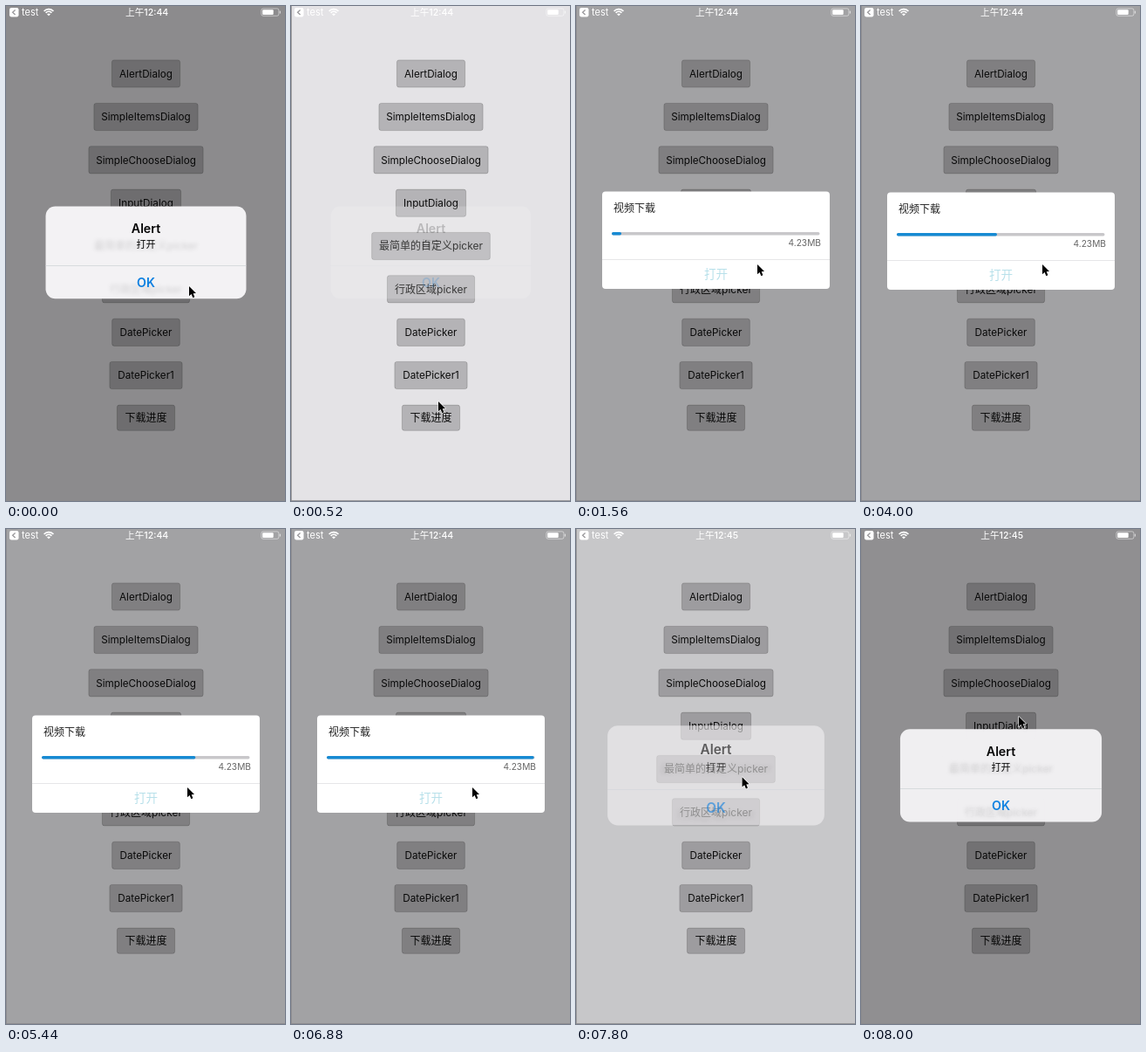
Recreate the animation shown at these times as an HTML page with a canvas. Size 320 by 567 pixels, loop 8.04 s.

```html
<!DOCTYPE html>
<html lang="zh">
<head>
<meta charset="utf-8">
<title>Dialogs</title>
<style>
  html, body { margin: 0; width: 100%; height: 100%; overflow: hidden; background: #e8e7ea; }
  canvas { display: block; width: 100vw; height: 100vh; }
</style>
</head>
<body>
<canvas id="stage"></canvas>
<script>
const W = 320, H = 567, LOOP = 8040, CX = 160.5;
const FONT = 'Inter, "Noto Sans CJK SC", "Noto Sans CJK", sans-serif';
const canvas = document.getElementById('stage');
const ctx = canvas.getContext('2d');
const ratio = window.devicePixelRatio || 1;
canvas.width = W * ratio;
canvas.height = H * ratio;

// label, centre y, width, height, font size
const buttons = [
  ['AlertDialog', 77.5, 79, 32, 11.7],
  ['SimpleItemsDialog', 127, 120, 32, 11.7],
  ['SimpleChooseDialog', 176.3, 132, 32, 11.7],
  ['InputDialog', 225.7, 81, 32, 11.7],
  ['最简单的自定义picker', 275, 136.5, 32, 12],
  ['行政区域picker', 324.3, 101, 32, 12],
  ['DatePicker', 373.8, 78.5, 32, 11.7],
  ['DatePicker1', 423, 84, 32, 11.7],
  ['下载进度', 471.7, 67, 30, 12]
];

// time, x, y of the pointer tip
const pointerPath = [
  [0, 210, 321], [80, 165, 313], [280, 165, 313], [520, 169, 453],
  [680, 165, 468], [1120, 165, 468], [1500, 208, 296], [7040, 208, 296],
  [7280, 194, 309], [7700, 194, 309], [8000, 181, 215], [LOOP, 181, 215]
];

const clamp = (v, lo = 0, hi = 1) => Math.min(hi, Math.max(lo, v));
const progress = (t, from, to) => clamp((t - from) / (to - from));
const smooth = p => p * p * (3 - 2 * p);
// Remaining distance of a critically damped spring
const settle = x => x < 0 ? 1 : (1 + x) * Math.exp(-x);
// Remaining distance of a slightly bouncy spring, s in seconds
const bounce = s => s < 0 ? 1 : Math.exp(-11 * s) * (Math.cos(10.45 * s) + 1.05 * Math.sin(10.45 * s));

function text(str, x, baseline, size, color, align = 'center', weight = 400) {
  ctx.font = `${weight} ${size}px ${FONT}`;
  ctx.textAlign = align;
  ctx.fillStyle = color;
  ctx.fillText(str, x, baseline);
}

function box(x, y, w, h, r, fill, stroke) {
  ctx.beginPath();
  ctx.roundRect(x, y, w, h, r);
  if (fill) { ctx.fillStyle = fill; ctx.fill(); }
  if (stroke) { ctx.strokeStyle = stroke; ctx.lineWidth = 0.8; ctx.stroke(); }
}

function rect(x, y, w, h, color) {
  ctx.fillStyle = color;
  ctx.fillRect(x, y, w, h);
}

function drawPage() {
  rect(0, 0, W, H, '#e8e7ea');
  for (const [label, y, w, h, size] of buttons) {
    box(CX - w / 2 + 0.4, y - h / 2 + 0.4, w - 0.8, h - 0.8, 2.5, 'rgba(0,0,0,.21)', 'rgba(0,0,0,.22)');
    text(label, CX, y + 4.3, size, '#0b0b0b');
  }
}

function drawDownload(t, shift) {
  const done = t > 6940;
  const end = clamp(52 + 0.0426 * (t - 1560), 41, 279.5);
  ctx.save();
  ctx.translate(0, shift);
  box(30, 213.5, 261, 111.5, 4, '#fff');
  text('视频下载', 43, 237.3, 12, '#222', 'left');
  box(41, 260, 238.5, 3.5, 1.7, '#c8c7ca');
  if (end > 41) box(41, 260, end - 41, 3.5, 1.7, '#168ad3');
  text('4.23MB', 281, 275.8, 10.2, '#666', 'right');
  rect(30, 291, 261, 0.7, '#dcdcde');
  text('打开', CX, 313, 13.6, done ? '#1097d5' : '#b7e0ea');
  ctx.restore();
}

function drawAlert(alpha, scale) {
  ctx.save();
  ctx.translate(CX, 282.3);
  ctx.scale(scale, scale);
  ctx.translate(-CX, -282.3);
  ctx.globalAlpha = alpha;
  box(45.5, 229.5, 230, 105.7, 11, '#f3f2f4');
  // Labels behind the frosted panel
  ctx.globalAlpha = alpha * 0.14;
  ctx.filter = `blur(${2 * ratio}px)`;
  for (const [label, y, , , size] of buttons.slice(4, 6)) text(label, CX, y + 4.3, size, '#000');
  ctx.filter = 'none';
  ctx.globalAlpha = alpha;
  rect(45.5, 297, 230, 0.7, '#cdd2d6');
  text('Alert', CX, 260.2, 14.2, '#000', 'center', 600);
  text('打开', CX, 277.2, 11, '#000');
  text('OK', CX, 322.2, 14.2, '#0b7fe0', 'center', 600);
  ctx.restore();
}

function drawStatusBar(t) {
  box(4, 2, 10.5, 10.5, 2.2, '#fff');
  ctx.beginPath();
  ctx.moveTo(10.6, 4.4);
  ctx.lineTo(7.6, 7.2);
  ctx.lineTo(10.6, 10);
  ctx.strokeStyle = '#99989b';
  ctx.lineWidth = 1.3;
  ctx.stroke();
  text('test', 18, 11, 11, '#fff', 'left');

  ctx.strokeStyle = '#fff';
  ctx.lineWidth = 1.6;
  for (const r of [4.6, 7.4]) {
    ctx.beginPath();
    ctx.arc(49, 11, r, -Math.PI * 0.76, -Math.PI * 0.24);
    ctx.stroke();
  }
  ctx.beginPath();
  ctx.moveTo(49, 11.3);
  ctx.arc(49, 11.3, 2.7, -Math.PI * 0.76, -Math.PI * 0.24);
  ctx.fillStyle = '#fff';
  ctx.fill();

  text(t < 7300 ? '上午12:44' : '上午12:45', 161.7, 11, 10.6, '#fff', 'center', 500);

  box(292.9, 2.9, 20, 8.4, 2, null, 'rgba(255,255,255,.6)');
  box(294.2, 4.2, 12.5, 5.8, 1, '#fff');
  box(313.8, 5.5, 1.2, 3.2, 0.6, 'rgba(255,255,255,.6)');
}

function drawPointer(t) {
  const i = pointerPath.findIndex(key => key[0] > t);
  const [t0, x0, y0] = pointerPath[i - 1], [t1, x1, y1] = pointerPath[i];
  const p = smooth(progress(t, t0, t1));
  ctx.save();
  ctx.translate(x0 + (x1 - x0) * p, y0 + (y1 - y0) * p);
  ctx.beginPath();
  for (const [x, y] of [[0, 0], [0, 11.3], [2.6, 9], [4.4, 13.2], [6.4, 12.3], [4.7, 8.3], [8, 8]]) ctx.lineTo(x, y);
  ctx.closePath();
  ctx.lineJoin = 'round';
  ctx.lineWidth = 1.4;
  ctx.strokeStyle = 'rgba(255,255,255,.85)';
  ctx.stroke();
  ctx.fillStyle = '#000';
  ctx.fill();
  ctx.restore();
}

function draw(t) {
  ctx.setTransform(canvas.width / W, 0, 0, canvas.height / H, 0, 0);
  drawPage();

  const opening = bounce((t - 1070) / 1000);
  const entering = settle((t - 7690) * 0.018);
  const alertAlpha = t < 4000 ? settle((t - 260) * 0.0115) : 1 - entering;
  const downloadDim = 0.3 * clamp(1 - opening) * (1 - progress(t, 7560, 7760));
  const alertDim = 0.4 * alertAlpha ** 2;
  rect(0, 0, W, H, `rgba(0,0,0,${1 - (1 - downloadDim) * (1 - alertDim)})`);

  if (t > 1070 && t < 7640) drawDownload(t, 400 * (opening + smooth(progress(t, 7460, 7640))));
  if (alertAlpha > 0.004) drawAlert(alertAlpha, t < 4000 ? 1 : 1 + 0.2 * entering);

  drawStatusBar(t);
  rect(0, 0, 0.8, H, '#8b8a8d');
  rect(0, H - 0.8, W, 0.8, '#8b8a8d');
  drawPointer(t);
}

const start = performance.now();
function tick() {
  draw((performance.now() - start) % LOOP);
  requestAnimationFrame(tick);
}
tick();
</script>
</body>
</html>
```
